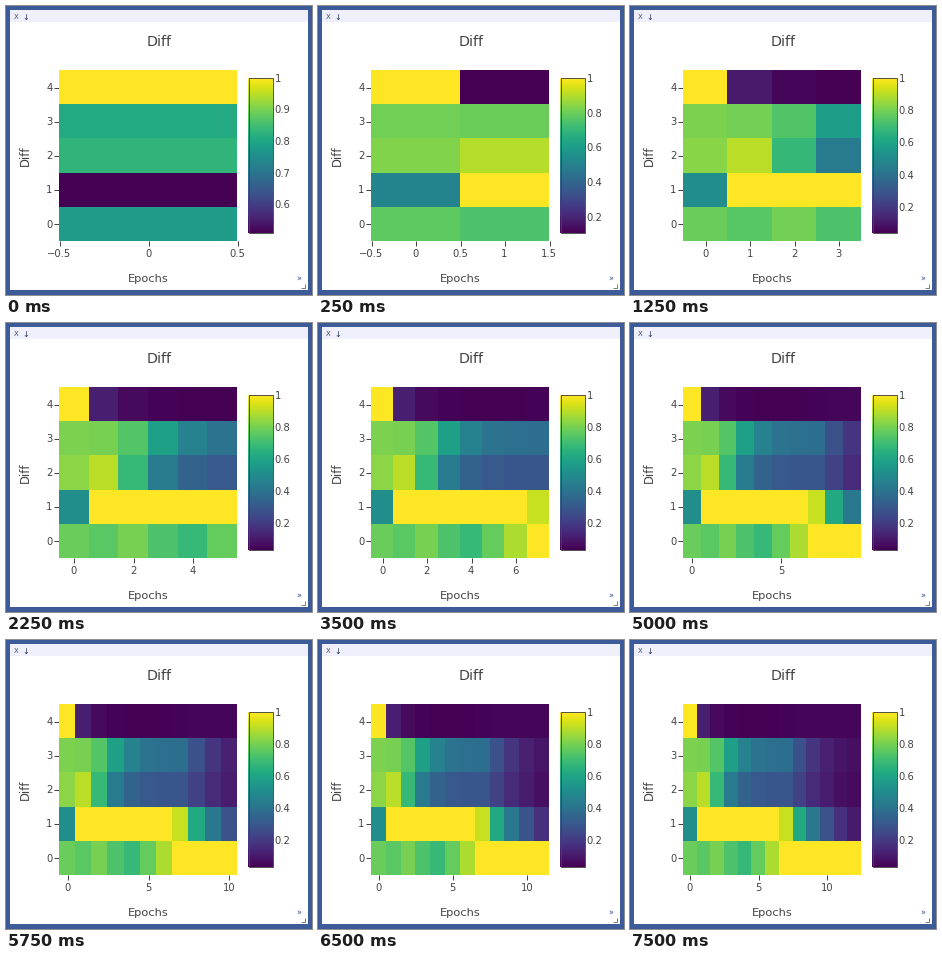
A matplotlib script for the animation above (8000 ms loop, 306 by 289 pixels).

```python
import math

import matplotlib.pyplot as plt
import numpy as np
from matplotlib.animation import FuncAnimation
from matplotlib.patches import Rectangle

W, H = 306, 289
STEP_MS, LOOP_MS = 250, 8000
LEFT, RIGHT, TOP, BOTTOM = 53, 231, 64, 235
BAR_X0, BAR_X1, BAR_TOP, BAR_BOTTOM = 242, 267, 72, 227
INK = "#444444"

# Times at which each epoch's column arrives
ARRIVALS = [0, 250, 750, 1250, 1750, 2250, 3000, 3500, 4250, 5000, 5750, 6500, 7500]

# One row per category, top row first
DIFF = np.array([
    [1, .11, .055, .04, .03, .03, .032, .04, .045, .045, .045, .045, .045],
    [.81, .80, .74, .58, .46, .40, .385, .38, .27, .18, .12, .085, .07],
    [.83, .90, .68, .43, .34, .30, .29, .29, .22, .15, .105, .07, .06],
    [.51] + [1] * 6 + [.92, .62, .42, .28, .17, .10],
    [.78, .75, .80, .73, .68, .77, .88] + [1] * 6,
])

plt.rcParams["font.family"] = "DejaVu Sans"
fig = plt.figure(figsize=(W / 72, H / 72), dpi=72)
ax = fig.add_axes([0, 0, 1, 1])
ax.set_xlim(0, W)
ax.set_ylim(H, 0)
ax.axis("off")


def box(x0, y0, x1, y1, **style):
    ax.add_patch(Rectangle((x0, y0), x1 - x0, y1 - y0, **style))


def label(x, y, text, size=10, ha="center", color=INK, **kw):
    return ax.text(x, y, text, size=size, ha=ha, va="baseline", color=color, **kw)


def line(xs, ys, color=INK, width=1):
    return ax.plot(xs, ys, color=color, lw=width, solid_capstyle="butt")[0]


def tick_step(span):
    """Smallest step from 2, 5, 10 (times a power of ten) above a fifth of the span."""
    rough = span / 5
    base = 10 ** math.floor(math.log10(rough) + 1e-9)
    return base * next(m for m in (2, 5, 10) if m > rough / base + 1e-9)


def ticks(low, high, step):
    first = math.ceil(low / step - 1e-9)
    last = math.floor(high / step + 1e-9)
    return [k * step for k in range(first, last + 1)]


def number(value):
    return f"{round(value, 6):g}".replace("-", "\u2212")


def draw_window():
    box(0, 0, W, H, fc="#3d5a99", lw=0)
    box(4, 4, 302, 284, fc="white", lw=0)
    box(4, 4, 302, 16, fc="#f0f0fc", lw=0)
    label(10, 13, "X", 7, color="#46536f")
    label(20, 14.5, "\u2193", 8, color="#223366")
    label(292.5, 276, "\u00bb", 8, color="#33508f")
    line([295, 298.5, 298.5], [281.5, 281.5, 278], "#808080")


def draw_fixed_labels():
    label(153.5, 40, "Diff", 14.3)
    label(142, 276, "Epochs", 11.4)
    ax.text(23, 149.5, "Diff", size=11.6, color=INK, rotation=90,
            rotation_mode="anchor", ha="center", va="baseline")
    row_height = (BOTTOM - TOP) / len(DIFF)
    for k in range(len(DIFF)):
        y = BOTTOM - (k + .5) * row_height
        line([48, 53], [math.floor(y) + .5] * 2)
        label(46.5, y + 3.7, str(k), ha="right")


draw_window()
draw_fixed_labels()
heat = ax.imshow(DIFF, cmap="viridis", aspect="auto", interpolation="nearest",
                 extent=(LEFT, RIGHT, BOTTOM, TOP), zorder=2)
ax.imshow(np.linspace(1, 0, 256)[:, None], cmap="viridis", aspect="auto",
          extent=(BAR_X0, BAR_X1, BAR_BOTTOM, BAR_TOP), zorder=2)
box(BAR_X0 + .5, BAR_TOP - .5, BAR_X1 - .5, BAR_BOTTOM - .5,
    fill=False, ec=INK, lw=.9, zorder=3)
ax.set_xlim(0, W)
ax.set_ylim(H, 0)

tick_artists = []


def draw(frame):
    count = sum(t <= frame * STEP_MS for t in ARRIVALS)
    shown = DIFF[:, :count]
    low = shown.min()
    heat.set_data(shown)
    heat.set_clim(low, 1)

    while tick_artists:
        tick_artists.pop().remove()
    for v in ticks(-.5, count - .5, tick_step(count)):
        x = LEFT + (RIGHT - LEFT) * (v + .5) / count
        tick_artists.append(line([math.floor(x) + .5] * 2, [235, 240]))
        tick_artists.append(label(x, 251, number(v)))
    for v in ticks(low, 1, .1 if low > .5 else .2):
        y = BAR_TOP + (BAR_BOTTOM - BAR_TOP) * (1 - v) / (1 - low)
        tick_artists.append(label(268.5, y + 3.7, number(v), ha="left"))
    return [heat, *tick_artists]


anim = FuncAnimation(fig, draw, frames=LOOP_MS // STEP_MS, interval=STEP_MS,
                     init_func=lambda: draw(0), repeat=True, repeat_delay=0)
plt.show()
```
